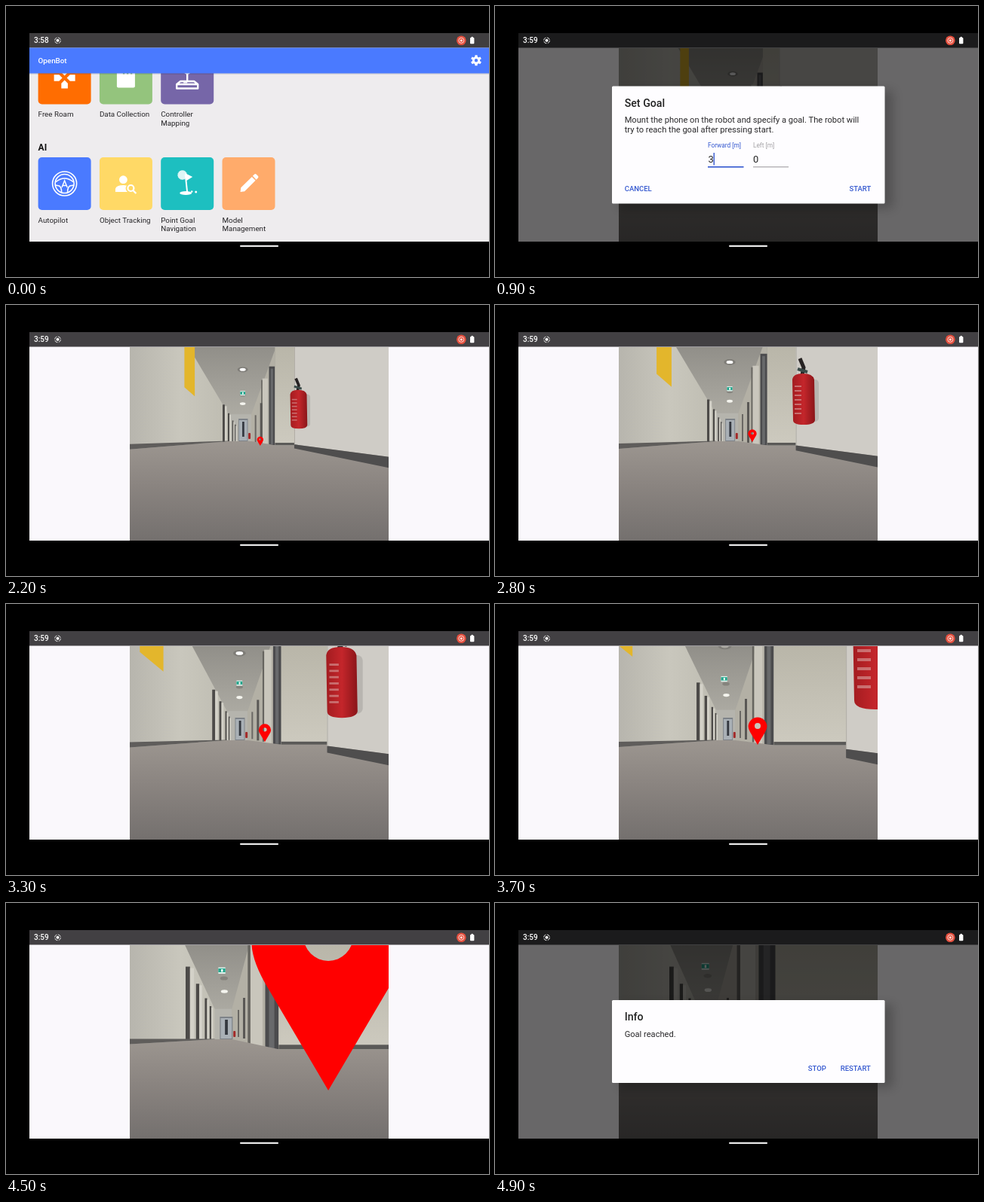
An HTML page that plays this animation: 640 by 360 pixels, repeating every 5000 ms.

```html
<!DOCTYPE html>
<html lang="en">
<head>
<meta charset="utf-8">
<title>Point goal navigation</title>
<style>
  html, body { margin: 0; width: 100%; height: 100%; overflow: hidden; background: #000; }
  svg { display: block; width: 100vw; height: 100vh; font-family: Roboto, sans-serif; }
</style>
</head>
<body>
<svg id="stage" viewBox="0 0 640 360">
  <defs>
    <clipPath id="screenClip"><rect x="31" y="89" width="609" height="224"/></clipPath>
    <clipPath id="cameraClip"><rect x="164" y="56" width="343" height="257"/></clipPath>
    <linearGradient id="floor" gradientUnits="userSpaceOnUse" x1="0" y1="181" x2="0" y2="313">
      <stop offset="0" stop-color="#9c9690"/><stop offset=".45" stop-color="#8a8480"/><stop offset="1" stop-color="#74706e"/>
    </linearGradient>
    <linearGradient id="leftWall" gradientUnits="userSpaceOnUse" x1="164" y1="0" x2="300" y2="0">
      <stop offset="0" stop-color="#b7b5ad"/><stop offset=".5" stop-color="#c9c7bd"/><stop offset="1" stop-color="#bdbbb0"/>
    </linearGradient>
    <linearGradient id="ceiling" gradientUnits="userSpaceOnUse" x1="0" y1="56" x2="0" y2="150">
      <stop offset="0" stop-color="#918f89"/><stop offset="1" stop-color="#aeaca4"/>
    </linearGradient>
    <linearGradient id="frontWall" x1="0" y1="0" x2="0" y2="1">
      <stop offset="0" stop-color="#b9b6a9"/><stop offset="1" stop-color="#cdcabf"/>
    </linearGradient>
    <linearGradient id="red" x1="0" y1="0" x2="1" y2="0">
      <stop offset="0" stop-color="#a31c20"/><stop offset=".5" stop-color="#c4262b"/><stop offset="1" stop-color="#8a1519"/>
    </linearGradient>
    <filter id="soft" x="-20%" y="-20%" width="140%" height="140%"><feGaussianBlur stdDeviation="7"/></filter>
  </defs>
  <rect width="640" height="360"/>
  <g id="content"></g>
  <g id="status"></g>
  <rect x="310" y="317.8" width="51" height="2.2" rx="1.1" fill="#e8e8e8"/>
</svg>
<script>
const LOOP = 5000;
const MENU_END = 900, DIALOG_END = 1900, GOAL_REACHED = 4700, PIN_END = 4600;
const TIMES = [1900, 2800, 3700, 4500, 4800];
const BLUE = '#4a7aff', LINK = '#3357cf';
const content = document.getElementById('content');
const status = document.getElementById('status');

const rect = (x, y, w, h, fill, extra = '') =>
  `<rect x="${x}" y="${y}" width="${w}" height="${h}" fill="${fill}" ${extra}/>`;
const circle = (x, y, r, fill, extra = '') =>
  `<circle cx="${x}" cy="${y}" r="${r}" fill="${fill}" ${extra}/>`;
const ellipse = (x, y, rx, ry, fill) =>
  `<ellipse cx="${x}" cy="${y}" rx="${rx}" ry="${ry}" fill="${fill}"/>`;
const poly = (points, fill) => `<polygon points="${points.join(' ')}" fill="${fill}"/>`;
const path = (d, extra) => `<path d="${d}" ${extra}/>`;
const text = (x, y, size, fill, str, weight = 400) =>
  `<text x="${x}" y="${y}" font-size="${size}" fill="${fill}" font-weight="${weight}">${str}</text>`;
const group = (attrs, body) => `<g ${attrs}>${body}</g>`;

// Piecewise linear value over TIMES
function keyed(t, values) {
  if (t <= TIMES[0]) return values[0];
  for (let i = 1; i < TIMES.length; i++) {
    if (t <= TIMES[i]) {
      const k = (t - TIMES[i - 1]) / (TIMES[i] - TIMES[i - 1]);
      return values[i - 1] + (values[i] - values[i - 1]) * k;
    }
  }
  return values[values.length - 1];
}

const gear = (x, y, r) => {
  let teeth = '';
  for (let a = 0; a < 360; a += 60)
    teeth += rect(-r * .26, -r * 1.1, r * .52, r * .6, '#fff', `rx=".6" transform="rotate(${a})"`);
  return group(`transform="translate(${x} ${y})"`,
    teeth + circle(0, 0, r * .57, 'none', `stroke="#fff" stroke-width="${r * .45}"`));
};

const icons = {
  dpad() {
    let arms = '';
    for (let a = 0; a < 360; a += 90)
      arms += path('M-4.3 14V7.2L0 3L4.3 7.2V14Z', `fill="#fff" transform="rotate(${a})"`);
    return arms;
  },
  card: () => path('M-5 -14H10Q12 -14 12 -12V11Q12 13 10 13H-10Q-12 13 -12 11V-7Z', 'fill="#fff"') +
    [-4, 1, 6].map(x => rect(x, -11, 2.4, 6, '#94c47d')).join(''),
  joystick: () => path('M-14 8.5L-9 4.5H9L14 8.5V14H-14ZM-14 8.5H14M0 4.5V-7',
    'fill="none" stroke="#fff" stroke-width="2.4" stroke-linejoin="round"') +
    circle(0, -10, 4, 'none', 'stroke="#fff" stroke-width="2.4"') + rect(-5, 5, 5, 2, '#fff'),
  wheel: () => circle(0, 0, 16, 'none', 'stroke="#fff" stroke-width="1.6"') +
    circle(0, 0, 12.5, 'none', 'stroke="#fff" stroke-width="1.6"') +
    path('M-12 -2Q-6 -7 0 -7T12 -2M-12 2L-7 3Q-4 5 -4 11M12 2L7 3Q4 5 4 11',
      'fill="none" stroke="#fff" stroke-width="1.6"') +
    path('M-3.6 5L0 -4L3.6 5M-2.4 2.4H2.4', 'fill="none" stroke="#fff" stroke-width="1.5"'),
  search: () => circle(-3.5, -5.3, 5.4, '#fff') +
    path('M-14 11V7Q-13 2 -3 2Q-1 2 1 2.5Q-2 7 2 11Z', 'fill="#fff"') +
    circle(6.5, 6, 4, 'none', 'stroke="#fff" stroke-width="2.2"') +
    path('M9.5 9L13.5 13', 'stroke="#fff" stroke-width="2.3"'),
  golf: () => circle(-6.5, -11.5, 6.5, '#fff', 'opacity=".85"') +
    circle(-6.5, -11.5, 6.5, 'none', 'stroke="#1dbfc0" stroke-dasharray="1 1.5"') +
    path('M-3 -14L7 -9L-1 -4Z', 'fill="#fff"') +
    path('M-2.5 -12L0 12', 'stroke="#fff" stroke-width="2"') +
    ellipse(-2, 12.5, 8, 2.6, '#fff') + circle(6, 10.5, 1.3, '#fff') + circle(11.5, 11, 1.5, '#fff'),
  pencil: () => group('transform="rotate(45)"',
    path('M-3.4 -9.5H3.4V11L0 15.5L-3.4 11ZM-3.4 -11V-14Q-3.4 -16 -1.5 -16H1.5Q3.4 -16 3.4 -14V-11Z', 'fill="#fff"'))
};

function tile(col, row, color, icon, ...label) {
  const x = 42.6 + col * 81.3, y = row ? 201 : 60.5;
  return rect(x, y, 70, 70, color, 'rx="5"') +
    group(`transform="translate(${x + 35} ${y + 35})"`, icons[icon]()) +
    label.map((line, i) => text(x, y + 86.5 + i * 11.8, 9.8, '#262528', line)).join('');
}

function menu(t) {
  const tiles =
    tile(0, 0, '#ff6d01', 'dpad', 'Free Roam') +
    tile(1, 0, '#94c47d', 'card', 'Data Collection') +
    tile(2, 0, '#7666a8', 'joystick', 'Controller', 'Mapping') +
    text(42.6, 191.5, 12, '#111', 'AI', 700) +
    tile(0, 1, BLUE, 'wheel', 'Autopilot') +
    tile(1, 1, '#ffd966', 'search', 'Object Tracking') +
    tile(2, 1, '#1dbfc0', 'golf', 'Point Goal', 'Navigation') +
    tile(3, 1, '#ffab6b', 'pencil', 'Model', 'Management');
  const touch = t >= 700 ? circle(240, 238, 8, '#e6e6e6', 'opacity=".6"') : '';
  return rect(31, 36, 609, 20, '#403e40') + rect(31, 55.5, 609, 257.5, '#eeecee') +
    group('clip-path="url(#screenClip)"', tiles + touch) +
    rect(31, 55.5, 609, 34, BLUE) + rect(31, 89.5, 609, 1.5, '#000', 'opacity=".1"') +
    text(42.6, 76.2, 9.8, '#fff', 'OpenBot', 500) + gear(623, 72.3, 6.4);
}

function extinguisher(vx, vy, z) {
  if (z < .2) return '';
  let label = '';
  for (let y = -68; y < -30; y += 6) label += rect(86, y, 9, 2, '#d9a4a2', 'opacity=".6"');
  return group(`transform="translate(${vx} ${vy}) scale(${1 / z})"`,
    rect(108, -76, 10, 56, '#8d8a86', 'rx="5" opacity=".35"') +
    path('M93 -104L98 -92L96 -82', 'fill="none" stroke="#262222" stroke-width="5"') +
    path('M90 -90L103 -86', 'stroke="#3a4a48" stroke-width="4"') +
    path('M83 -76Q84 -84 97 -84T112 -76L113 -22Q112 -16 98 -16T84 -22Z', 'fill="url(#red)"') + label);
}

function pin(t, vx, vy) {
  if (t >= PIN_END) return '';
  const scale = 1 / keyed(t, [3.34, 2.17, 1, .122, .1]);
  const x = vx + keyed(t, [70, 65, 40, 16.6, 16]) * scale;
  const y = vy + keyed(t, [40, 15.2, 15, 9.4, 9]) * scale;
  return path('M0 0L-9.76 -16.6Q-12.4 -21 -12.4 -24A12.4 12.4 0 0 1 12.4 -24Q12.4 -21 9.76 -16.6Z' +
    'M-4 -25A4 4 0 0 0 4 -25A4 4 0 0 0 -4 -25Z',
    `fill="#f00" fill-rule="evenodd" transform="translate(${x} ${y}) scale(${scale})"`);
}

function corridor(t) {
  const vx = keyed(t, [315, 311, 308, 291, 284]);
  const vy = keyed(t, [177, 175, 172, 172, 172]);
  const travel = keyed(t, [0, .48, .98, 1.42, 1.62]);
  const left = keyed(t, [-158, -158, -128, -123, -118]);
  const right = 97 + keyed(t, [0, 0, -8, -26, -26]);
  const leftFloor = keyed(t, [192, 191, 190, 187.5, 187.5]);
  const farFloor = 181, H = -265, FAR = 8.5, NEAR = .3;
  const at = (x, y, z) => [vx + x / z, vy + y / z];

  const frontZ = 2.43 - travel, cornerZ = 1.61 - travel;
  const edge = vx + right / frontZ, frontFloor = vy + 22.5 / frontZ;
  const cornerX = cornerZ > .2 ? vx + 99 / cornerZ : 999;
  const endLeft = vx + left / FAR, endRight = vx + right / FAR;
  let out = rect(164, 56, 343, 257, 'url(#ceiling)');

  // Lamps, smoke detector and exit sign on the ceiling
  const lamp = (z, size, fill) => {
    const [x, y] = at(vx < 309 ? -10 : 0, -337, z - travel);
    return ellipse(x, y, size / (z - travel), size * .5 / (z - travel), fill);
  };
  out += lamp(3.88, 26, '#7e7c77') + lamp(3.88, 15, t < 3500 ? '#fff' : '#a9a7a0') +
    lamp(6.1, 24, '#85837d') + lamp(7.6, 28, '#f4f4ee');

  // Side walls and the far end
  out += rect(endLeft, vy + H / FAR, endRight - endLeft, 40, '#b5b4ad');
  out += poly([at(left, H, NEAR), at(left, H, FAR), [endLeft, farFloor], [164, leftFloor], [0, leftFloor]], 'url(#leftWall)');
  out += poly([at(right, H, FAR), at(right, H, frontZ), [edge, frontFloor], [endRight, farFloor]], '#b3b0a5');

  // Doors along both sides
  const doorStart = keyed(t, [-25, -30, -41, -53, -53]);
  [1, .74, .52, .4].forEach((k, i) => {
    const off = doorStart * k, w = Math.max(1.4, -off * .11);
    const top = vy + off * 1.65;
    out += rect(vx + off, top, w, farFloor + 1 - i * .4 - top, '#4c4a48') +
      rect(vx + off + w, top + 2, w * .9, farFloor - top - 2, '#d3d1c8');
  });
  const band = 18 / frontZ, doorTop = vy - 215 / frontZ;
  out += rect(edge - band * 2.1, doorTop + 16, band * .9, frontFloor - doorTop - 18, '#c9c6bc') +
    rect(edge - band * 2.3, doorTop + 18, band * .2, frontFloor - doorTop - 22, '#66645f') +
    rect(edge - band, doorTop, band, frontFloor - doorTop, '#4b4b4d') +
    rect(edge - band * .72, doorTop + 3, band * .4, frontFloor - doorTop - 4, '#68696b') +
    rect(vx + 23, vy - 46, 3, 54, '#5a5855') + rect(vx + 16, vy - 30, 2, 36, '#6a6864');

  const doorW = keyed(t, [12, 13, 13, 17, 18]);
  out += rect(vx - doorW * .45, 151, doorW, 30, '#7d8288') +
    rect(vx - doorW * .38, 153, doorW * .86, 27, '#a9b0b6') +
    rect(vx - doorW * .05, 155, doorW * .22, 20, '#34383f') +
    rect(vx + doorW * .6, 170, 3, 8, '#a32a2a', 'rx="1"');

  // Floor and skirting
  const floorRight = cornerX < 507 ? vy + 20.5 * (507 - vx) / 99 : frontFloor;
  out += poly([[164, leftFloor], [endLeft, farFloor], [endRight, farFloor], [edge, frontFloor],
    [507, frontFloor], [507, 313], [164, 313]], 'url(#floor)');
  out += poly([[164, leftFloor - 7], [endLeft, farFloor - .6], [endLeft, farFloor], [164, leftFloor]], '#5f5d5b');
  out += rect(edge, 56, 507 - edge, frontFloor - 56, 'url(#frontWall)') +
    rect(edge, frontFloor - 5 / frontZ - 1, 507 - edge, 5 / frontZ + 1, '#5a5957');
  if (cornerX < 507) {
    const wallY = h => [[507, vy + h * (507 - vx) / 99], [cornerX, vy + h / cornerZ]];
    out += poly([[cornerX, 56], [507, 56], ...wallY(13)], '#cfccc6') +
      poly([...wallY(13).reverse(), ...wallY(20.5)], '#4f4e4e') +
      rect(cornerX, 56, 1, vy + 13 / cornerZ - 56, '#b0ada6');
  }

  // Poster on the left wall
  const px = keyed(t, [-147, -158, -195, -260, -260]);
  const py = keyed(t, [-128, -136, -158, -175, -175]);
  const z1 = 2.11 - travel, z2 = 2.53 - travel;
  out += poly([at(px, -400, z1), at(px, -400, z2), at(px, py, z2), at(px, py, z1)], '#e3b62c');

  const signZ = 4.64 - travel, [sx, sy] = at(vx < 309 ? -16 : 0, -265, signZ), u = 30 / signZ;
  out += rect(sx - u / 2, sy - u * .45, u, u * .9, '#e4f6f0') +
    rect(sx - u / 2, sy - u * .3, u, u * .55, '#25a58c') + rect(sx - u * .1, sy - u * .2, u * .25, u * .4, '#fff');

  out += extinguisher(vx, vy, 1.48 - travel) + pin(t, vx, vy);
  if (t < 2000 || t >= GOAL_REACHED) out += rect(164, 56, 343, 257, '#000', 'opacity=".17"');
  return rect(31, 36, 609, 20, '#424043') + rect(31, 55.5, 609, 257.5, '#faf8fc') +
    group('clip-path="url(#cameraClip)"', out);
}

function dialog(y, h, title, body, opacity) {
  return group(`opacity="${opacity}"`,
    rect(165, y + 6, 362, h, '#000', 'opacity=".22" filter="url(#soft)"') +
    rect(155, y, 361.5, h, '#fefdff', 'rx="1.5"') +
    text(171.7, y + 27, 14.2, '#222', title, 500) + body);
}

const goalBody =
  text(171.7, 155, 11.1, '#29282a', 'Mount the phone on the robot and specify a goal. The robot will') +
  text(171.7, 168, 11.1, '#29282a', 'try to reach the goal after pressing start.') +
  text(282, 187.8, 8.3, LINK, 'Forward [m]') + text(342, 187.8, 8.3, '#a3a1a4', 'Left [m]') +
  text(282.6, 208.3, 12.8, '#222', '3') + text(342, 208.3, 12.8, '#222', '0') +
  rect(289.5, 195, 1.4, 16.5, LINK) +
  rect(282, 213, 47.5, 1.6, LINK) + rect(342, 213.4, 47, .9, '#8b898c') +
  text(171.7, 246.4, 9.5, LINK, 'CANCEL', 500) + text(469.6, 246.4, 9.5, LINK, 'START', 500);

const infoBody = text(171.7, 178, 11.1, '#29282a', 'Goal reached.') +
  text(414.8, 223.2, 9.5, LINK, 'STOP', 500) + text(457.8, 223.2, 9.5, LINK, 'RESTART', 500);

function statusBar(t) {
  return text(37, 49.3, 10, '#fff', t < MENU_END ? '3:58' : '3:59', 500) +
    circle(68.5, 45.8, 3.9, 'none', 'stroke="#ddd" stroke-width="1" stroke-dasharray="4.6 1.5"') +
    circle(68.5, 45.8, 2, '#fff') +
    circle(603.3, 45.8, 6.3, '#e5503f') +
    circle(603.3, 45.8, 3.5, 'none', 'stroke="#ffd9d2" stroke-width="1"') + circle(603.3, 45.8, 1.6, '#ffd9d2') +
    rect(615, 42, 5.4, 8.2, '#fff', 'rx="1"') + rect(616.5, 40.9, 2.4, 1.5, '#fff');
}

function render(t) {
  let out;
  if (t < MENU_END) {
    out = menu(t);
  } else {
    out = corridor(t);
    const asking = t < DIALOG_END, done = t >= GOAL_REACHED;
    const fading = asking && t >= 1800;
    if (asking || done) out += rect(31, 36, 609, 277, '#000', `opacity="${fading ? .465 : .585}"`);
    if (asking) out += dialog(106.5, 156, 'Set Goal', goalBody, fading ? .77 : 1);
    if (asking && t >= 1700) out += circle(490, 244, 8, '#c9c9cc', 'opacity=".55"');
    if (done) out += dialog(129, 110, 'Info', infoBody, 1);
  }
  content.innerHTML = out;
  status.innerHTML = statusBar(t);
}

let shown = -1;
function tick() {
  const now = performance.now() % LOOP;
  const t = now < 300 ? 0 : Math.floor(now / 100) * 100;
  if (t !== shown) render(shown = t);
  requestAnimationFrame(tick);
}
tick();
</script>
</body>
</html>
```
